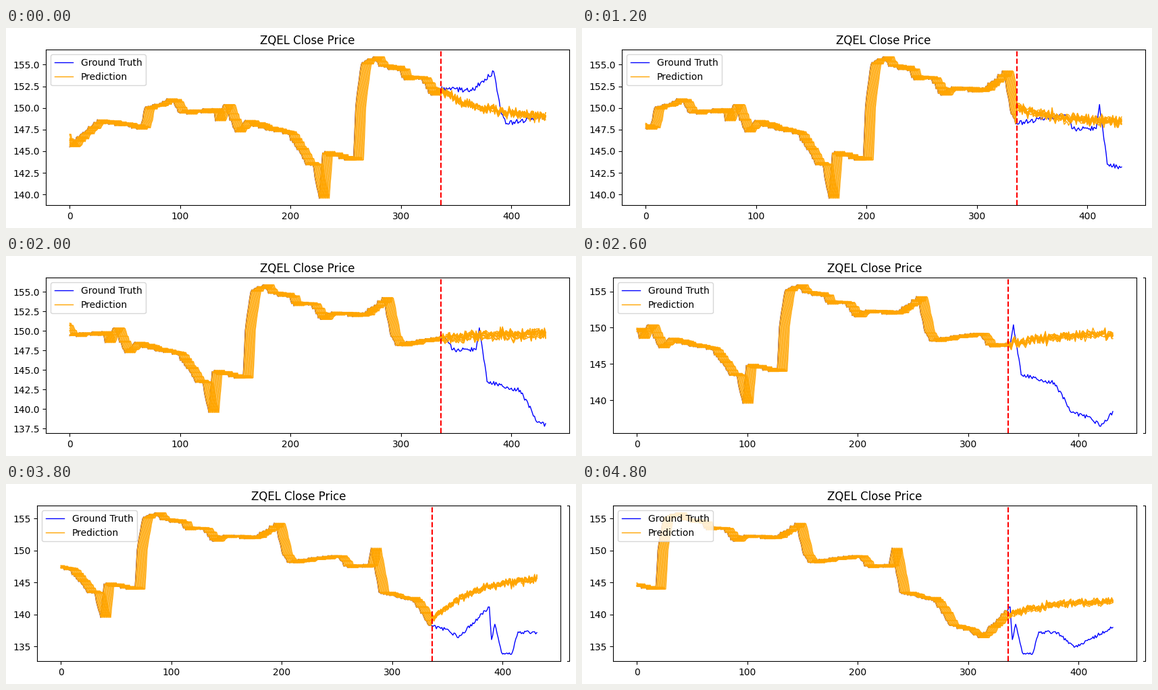
A matplotlib script for the animation above (5 s loop, 844 by 297 pixels).

```python
import numpy as np
import matplotlib.pyplot as plt
from matplotlib.animation import FuncAnimation
from matplotlib.lines import Line2D
from matplotlib.ticker import FormatStrFormatter, MultipleLocator

WIDTH, HEIGHT, DPI = 844, 297, 100
FRAMES, INTERVAL = 25, 200
STEP, HISTORY, LENGTH, RUNS = 10, 336, 432, 10
AX_W, AX_H, AX_BOTTOM = 775, 231, 33.6
LEFT_LONG, LEFT_SHORT = 59.2, 46.2  # plot edge beside long and short labels

# Key turning points of the price: (time step, price)
TURNS = np.array([
    (-10, 147), (0, 145.5), (11, 147), (26, 148.5), (64, 147.7), (68, 150),
    (92, 151), (99, 149.5), (130, 149.7), (132, 148.5), (140, 150.4),
    (150, 147.2), (158, 148.4), (197, 147), (208, 145), (214, 143.4),
    (220, 143.5), (226, 139.555), (229, 144.8), (257, 144), (259, 150.1),
    (264, 155), (275, 155.9), (280, 154.8), (299, 154.5), (301, 153.5),
    (318, 153.5), (327, 151.5), (334, 152.3), (364, 152), (384, 154.2),
    (391, 149.3), (396, 148.2), (440, 149.2), (447, 147.6), (468, 147.6),
    (471, 150.4), (478, 143.5), (508, 142.4), (524, 138.3), (541, 137.6),
    (550, 136.4), (578, 141.2), (580, 136.1), (583, 138.5), (589, 134.1),
    (598, 133.8), (604, 137.3), (621, 137.2), (636, 134.9), (671, 138),
])

# How far the forecast climbs over its horizon: (frame, change in price)
DRIFT = np.array([(0, -2.9), (4, -3.4), (8, 0), (13, 1.5),
                  (16, 5), (19, 6.4), (24, 2.2)])


def make_price():
    t = np.arange(-10, LENGTH + STEP * FRAMES)
    turn_times, turn_prices = TURNS.T
    jitter = np.random.default_rng(4).uniform(-0.28, 0.28, t.size)
    jitter[np.isin(t, turn_times)] = 0
    price = np.interp(t, turn_times, turn_prices) + jitter
    return price.clip(turn_prices.min(), turn_prices.max())


PRICE = make_price()
X = np.arange(LENGTH)
HORIZON = np.linspace(0, 1, LENGTH - HISTORY)


def window(start, length):
    return PRICE[start + 10:start + 10 + length]


def forecasts(n):
    """All forecast runs for one frame, one row per run."""
    start = window(STEP * n + HISTORY - RUNS, RUNS).mean()
    ease = (1 - np.exp(-2.5 * HORIZON)) / (1 - np.exp(-2.5))
    mean = start + np.interp(n, *DRIFT.T) * ease
    rng = np.random.default_rng(100 + n)
    shared = rng.normal(0, 0.2, HORIZON.size)
    offset = rng.normal(0, 0.22, (RUNS, 1))
    return mean + shared + offset + rng.normal(0, 0.12, (RUNS, HORIZON.size))


fig = plt.figure(figsize=(WIDTH / DPI, HEIGHT / DPI), dpi=DPI)
ax = fig.add_axes([0, 0, 1, 1])
truth, = ax.plot(X, X, color="blue", lw=1, label="Ground Truth")
runs = [ax.plot(X, X, color="orange", lw=1,
                label="Prediction" if k == 0 else None)[0]
        for k in range(RUNS)]
ax.axvline(HISTORY, color="r", ls="--")
ax.set_title("ZQEL Close Price")
ax.set_xlim(-0.05 * (LENGTH - 1), 1.05 * (LENGTH - 1))
ax.legend(loc="upper left")

# Edge of the wider plot, left standing after the plot moves
right, top = LEFT_LONG + AX_W, AX_BOTTOM + AX_H
edge = fig.add_artist(Line2D([831, right, right, 831],
                             [AX_BOTTOM, AX_BOTTOM, top, top],
                             color="black", lw=0.8, transform=None))


def update(n):
    visible = window(STEP * n - RUNS + 1, LENGTH + RUNS - 1)
    low, high = visible.min(), visible.max()
    margin = 0.05 * (high - low)
    ax.set_ylim(low - margin, high + margin)

    # A tall range gets whole-number ticks, whose labels need less room.
    tall = high - low + 2 * margin > 20
    ax.yaxis.set_major_locator(MultipleLocator(5 if tall else 2.5))
    ax.yaxis.set_major_formatter(FormatStrFormatter("%d" if tall else "%.1f"))
    left = LEFT_SHORT if tall else LEFT_LONG
    ax.set_position([left / WIDTH, AX_BOTTOM / HEIGHT,
                     AX_W / WIDTH, AX_H / HEIGHT])
    edge.set_visible(tall)

    truth.set_ydata(window(STEP * n, LENGTH))
    for k, (line, ahead) in enumerate(zip(runs, forecasts(n))):
        past = window(STEP * n - k, HISTORY)
        line.set_ydata(np.concatenate([past, ahead]))
    return [truth, *runs]


anim = FuncAnimation(fig, update, frames=FRAMES, interval=INTERVAL,
                     init_func=lambda: update(0), repeat=True, repeat_delay=0)
plt.show()
```
